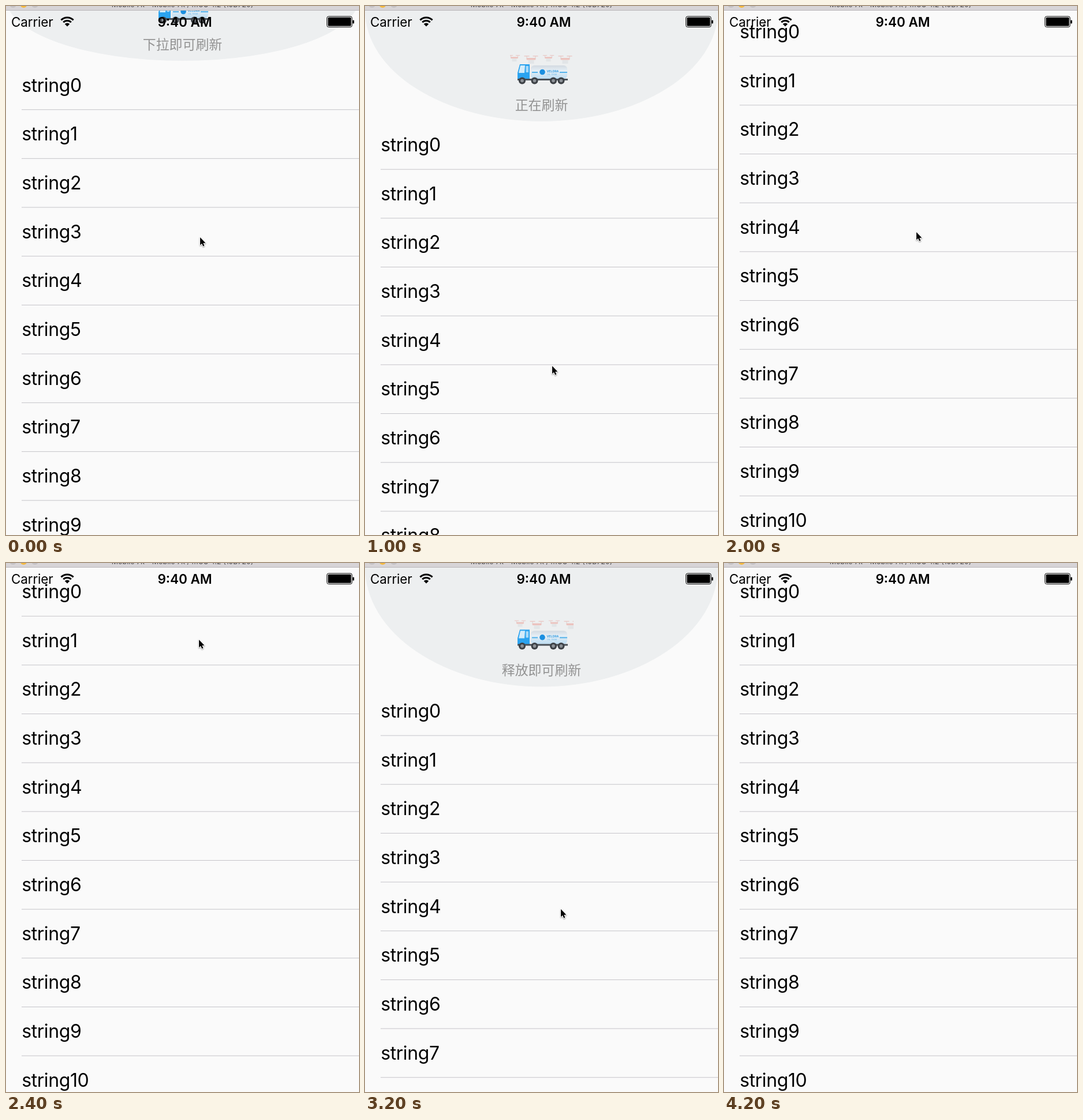
These frames come from a looping animation (611x917 px, 4.4 s). An HTML page with a canvas:

```html
<!DOCTYPE html>
<html lang="zh-CN">
<head>
<meta charset="utf-8">
<title>Pull to refresh</title>
<style>
html, body { margin: 0; width: 100%; height: 100%; overflow: hidden; background: #fafafa; }
canvas { display: block; width: 611px; height: 917px; }
</style>
</head>
<body>
<canvas id="stage" width="611" height="917"></canvas>
<script>
const W = 611, H = 917, STEP = 200, STEPS = 22;
const ROW = 84.67, REST = 7.5, HOLD = 191, TRIGGER = 180;
const ctx = document.getElementById('stage').getContext('2d');
const UI = 'Inter, "Liberation Sans", sans-serif';
const CJK = '"Noto Sans CJK SC", "Noto Sans CJK", sans-serif';

// Pointer stops, joined by straight moves.
const stops = [
  { at: 0, x: 336, y: 401 }, { at: 3, x: 324, y: 624 }, { at: 5, x: 324, y: 624 },
  { at: 7, x: 332, y: 466 }, { at: 9, x: 334, y: 588 }, { at: 10, x: 333, y: 392 },
  { at: 11, x: 334, y: 133 }, { at: 12, x: 334, y: 133 }, { at: 14, x: 334, y: 507 },
  { at: 16, x: 339, y: 600 }, { at: 18, x: 339, y: 600 }, { at: 22, x: 823, y: 1008 }
];

// The list follows the pointer until release, then stays open until done.
const pulls = [
  { start: 0, release: 4, done: 6, grab: 230.4 },
  { start: 6, release: 9, done: 11, grab: 193 },
  { start: 13, release: 17, done: 19, grab: 152.6 }
];

function pointerAt(step) {
  const i = stops.findIndex(stop => stop.at > step);
  const a = stops[i - 1], b = stops[i];
  const p = (step - a.at) / (b.at - a.at);
  return { x: a.x + (b.x - a.x) * p, y: a.y + (b.y - a.y) * p };
}

function rubberBand(distance) {
  const pull = 0.55 * Math.max(0, distance);
  return pull / (1 + pull / 1300);
}

function offsetAt(step) {
  const { start, release, done, grab } = pulls.findLast(pull => pull.start <= step);
  const y = pointerAt(step).y;
  if (step < release) return rubberBand(y - grab);
  if (step < done) return HOLD + Math.min(0, y - pointerAt(release).y);
  const p = Math.min(1, (step - done + 1) / 2);
  return Math.max(0, offsetAt(done - 1)) * (1 - p * p);
}

function isBusy(step) {
  return pulls.some(pull => step >= pull.release && step < pull.done);
}

function rect(x, y, w, h, color) {
  ctx.fillStyle = color;
  ctx.fillRect(x, y, w, h);
}

function rounded(x, y, w, h, r, color) {
  ctx.fillStyle = color;
  ctx.beginPath();
  ctx.roundRect(x, y, w, h, r);
  ctx.fill();
}

function disc(x, y, r, color) {
  ctx.fillStyle = color;
  ctx.beginPath();
  ctx.arc(x, y, r, 0, Math.PI * 2);
  ctx.fill();
}

function polygon(points, color) {
  ctx.fillStyle = color;
  ctx.beginPath();
  points.forEach(([x, y]) => ctx.lineTo(x, y));
  ctx.closePath();
  ctx.fill();
}

function text(str, x, y, font, color = '#000', align = 'left', spacing = 0) {
  ctx.font = font;
  ctx.fillStyle = color;
  ctx.textAlign = align;
  ctx.letterSpacing = spacing + 'px';
  ctx.fillText(str, x, y);
}

function drone(x, y, size) {
  ctx.save();
  ctx.translate(x, y);
  ctx.scale(size, size);
  for (const side of [-1, 1]) {
    rect(side * 7.5 - 4.5, 0, 9, 1.5, '#e9b5ae');
    rect(side * 7.5 - 0.7, 1, 1.4, 4, '#dcc6c4');
  }
  rounded(-8, 4, 16, 3.5, 1.5, '#eba79e');
  rect(-5, 8, 10, 6, '#dcdfe1');
  ctx.restore();
}

function drones(step) {
  const shift = (25.5 + 17 * step) % 59;
  ctx.save();
  ctx.beginPath();
  ctx.rect(251, -120, 110, 50);
  ctx.clip();
  ctx.globalAlpha = 0.6;
  for (let x = 177 + shift; x < 380; x += 59) {
    drone(x, -114, 1);
    drone(x + 30, -115, 0.8);
  }
  ctx.restore();
}

function truck() {
  const tank = ctx.createLinearGradient(0, -97, 0, -74);
  tank.addColorStop(0, '#d3dae1');
  tank.addColorStop(0.4, '#e6eff6');
  tank.addColorStop(1, '#bcdcf1');
  rounded(287, -97, 63, 23, 6, tank);
  rect(289, -86, 10, 2, '#55b2ea');
  rect(337, -86, 13, 2, '#55b2ea');
  disc(307, -85.5, 4.8, '#1b8fe0');
  text('VELDRA', 314.5, -85, '700 5.2px ' + UI, '#3a9fe2');
  text('OIL TANK', 315, -80, '3.8px ' + UI, '#6db8e8');

  polygon([[268, -99], [285, -99], [285, -73], [264, -73], [264, -84]], '#2ba3ef');
  polygon([[269, -97], [277, -97], [276, -84], [266, -84]], '#d3ecfa');
  rect(278.5, -96, 4.5, 11, '#a9daf8');
  rect(264, -74, 87, 3, '#4b5158');
  for (const x of [272, 293.5, 326, 339.5]) {
    disc(x, -70.5, 6, '#3d4146');
    disc(x, -70.5, 2.8, '#8d9298');
  }
}

function header(bottom, label, step) {
  const center = REST - 0.2 * Math.max(0, 200 - bottom);
  ctx.fillStyle = '#edeff0';
  ctx.beginPath();
  ctx.ellipse(W / 2, center, W / 2, Math.max(0, bottom - center), 0, 0, Math.PI * 2);
  ctx.fill();
  ctx.save();
  ctx.translate(0, bottom);
  drones(step);
  truck();
  text(label, W / 2, -20.3, '300 22.9px ' + CJK, '#929292', 'center');
  ctx.restore();
}

function list(top) {
  for (let i = 0; i < 11; i++) {
    const y = top + i * ROW;
    text('string' + i, 27.3, y + 53.5, '32px ' + UI, '#000', 'left', -0.4);
    rect(27, y + ROW - 0.5, W - 27, 1, '#c5c4c9');
  }
}

function statusBar() {
  text('Carrier', 9, 35.5, '22.4px ' + UI, '#000', 'left', -0.1);
  text('9:40 AM', 309.5, 35.5, '600 22.5px ' + UI, '#000', 'center');

  ctx.strokeStyle = '#000';
  ctx.lineWidth = 3;
  for (const r of [9.5, 15]) {
    ctx.beginPath();
    ctx.arc(106, 35, r, -Math.PI * 0.75, -Math.PI * 0.25);
    ctx.stroke();
  }
  ctx.fillStyle = '#000';
  ctx.beginPath();
  ctx.moveTo(106, 35.5);
  ctx.arc(106, 35.5, 6, -Math.PI * 0.75, -Math.PI * 0.25);
  ctx.fill();

  ctx.lineWidth = 1;
  ctx.beginPath();
  ctx.roundRect(555.5, 18, 43.5, 18.5, 3);
  ctx.stroke();
  rounded(557.3, 19.8, 40, 15, 1.5, '#000');
  rounded(600, 24.5, 2.5, 6, 1, '#000');
}

function titleBar() {
  rect(0, 0, W, 7, '#d7d4d7');
  rect(0, 7, W, 1, '#b9b6b9');
  disc(12, -3, 6, '#c4c1c4');
  disc(30.5, -3, 6, '#f5b83d');
  disc(50, -3, 6, '#c4c1c4');
  text('Mobile 7k - Mobile 7k / mOS 4.2 (15B720)', W / 2, 1.5, '12.5px ' + UI, '#4a484a', 'center');
}

function pointer({ x, y }) {
  const shape = [[0, 0], [0, 13.5], [3, 10.8], [5.2, 15.6], [7.4, 14.6], [5.3, 9.9], [9.4, 9.7]];
  ctx.save();
  ctx.translate(x, y);
  ctx.strokeStyle = '#fff';
  ctx.lineWidth = 2;
  ctx.lineJoin = 'round';
  ctx.shadowColor = 'rgba(0,0,0,.35)';
  ctx.shadowBlur = 2;
  ctx.shadowOffsetY = 1;
  polygon(shape, '#000');
  ctx.stroke();
  ctx.shadowColor = 'transparent';
  polygon(shape, '#000');
  ctx.restore();
}

function draw(now) {
  const step = Math.floor(now / STEP) % STEPS;
  const offset = offsetAt(step), busy = isBusy(step);
  const label = busy ? '正在刷新' : offset > TRIGGER ? '释放即可刷新' : '下拉即可刷新';
  rect(0, 0, W, H, '#fafafa');
  if (offset > 0) header(REST + offset + (busy ? 1.5 : 0), label, step);
  list(REST + offset);
  statusBar();
  titleBar();
  pointer(pointerAt(step));
}

const start = performance.now();
function tick() {
  draw(performance.now() - start);
  requestAnimationFrame(tick);
}
tick();
</script>
</body>
</html>
```
